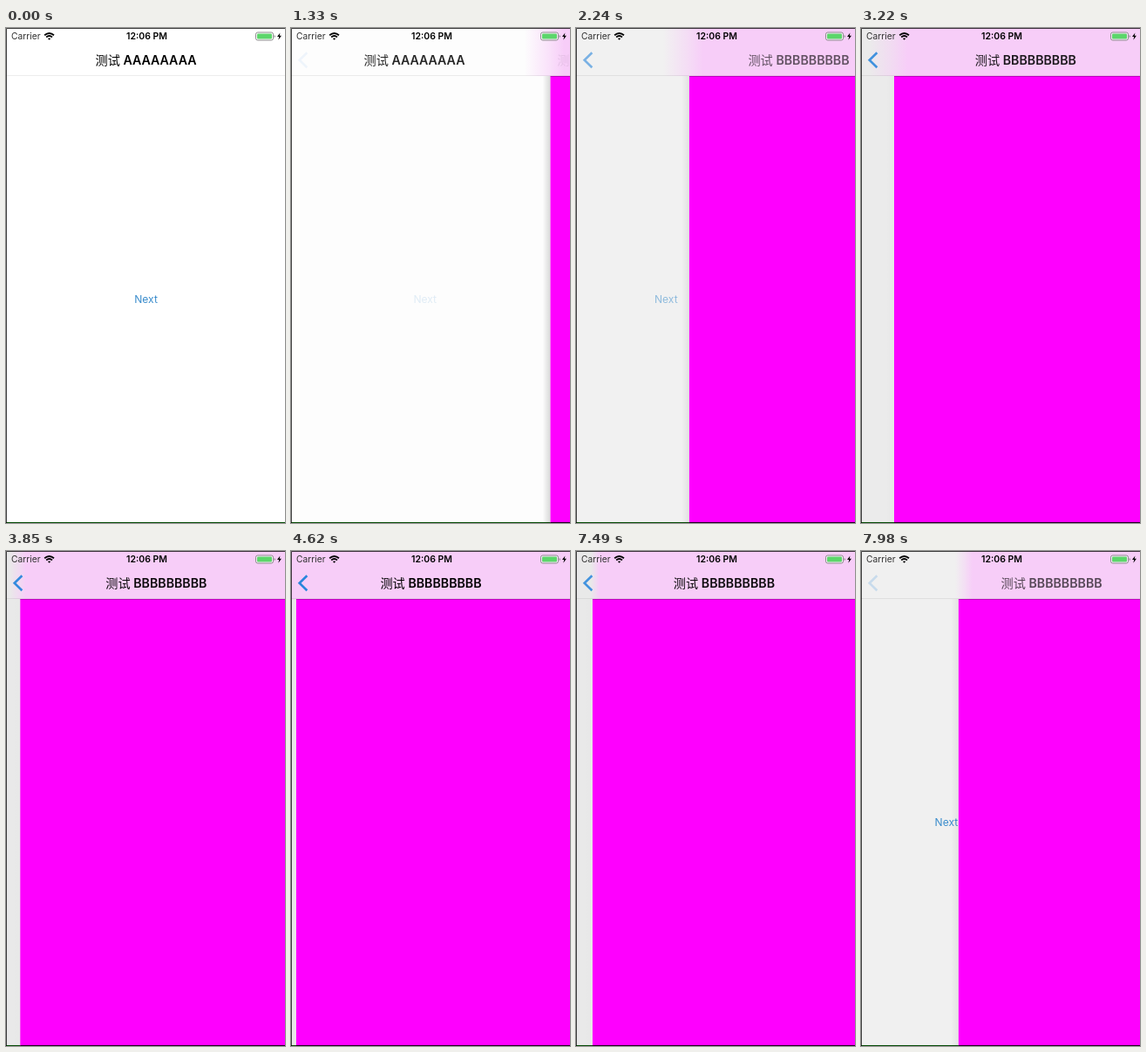
An HTML page that plays this animation: 320x567 px, repeating every 8000 ms.

```html
<!DOCTYPE html>
<html lang="zh">
<head>
<meta charset="utf-8">
<title>Navigation push and pop</title>
<style>
  html, body { margin: 0; width: 100%; height: 100%; overflow: hidden; background: #fff; }
  svg { display: block; width: 100vw; height: 100vh; }
  text { font-family: Inter, "Noto Sans CJK SC", "Noto Sans CJK", sans-serif; text-anchor: middle; }
  .title { font-size: 14.2px; font-weight: 600; }
  .han { font-weight: 500; }
  .carrier { font-size: 10.3px; fill: #333; text-anchor: start; }
  .clock { font-size: 10.5px; font-weight: 600; }
</style>
</head>
<body>
<svg viewBox="0 0 320 567" preserveAspectRatio="none">
  <defs>
    <linearGradient id="tint" gradientUnits="userSpaceOnUse" y1="0" y2="0">
      <stop offset="0" stop-color="#f7cdf8" stop-opacity="0"/>
      <stop offset=".6" stop-color="#f7cdf8" stop-opacity=".55"/>
      <stop offset="1" stop-color="#f7cdf8"/>
    </linearGradient>
    <linearGradient id="shade">
      <stop offset="0" stop-opacity="0"/>
      <stop offset="1" stop-opacity=".16"/>
    </linearGradient>
  </defs>

  <rect id="back" width="320" height="567"/>
  <text id="next" y="315.2" font-size="12.1" fill="#3a8ccc">Next</text>
  <rect y="566" width="320" height="1" fill="#064d06"/>

  <g id="page">
    <rect id="shadow" x="-9" y="55" width="9" height="512" fill="url(#shade)"/>
    <rect y="55" width="320" height="512" fill="#fe00fe"/>
    <rect y="55" width="320" height="1" fill-opacity=".25"/>
    <rect y="566" width="320" height="1" fill="#200020"/>
  </g>

  <rect id="bar" width="320" height="55"/>
  <rect id="barTint" width="320" height="55" fill="url(#tint)"/>
  <rect y="54" width="320" height="1" fill-opacity=".07"/>
  <text id="titleA" class="title" y="41.5"><tspan class="han">测试</tspan> AAAAAAAA</text>
  <text id="titleB" class="title" y="41.5"><tspan class="han">测试</tspan> BBBBBBBBB</text>
  <path id="arrow" d="M18.4 28.2 9.7 36.7 18.4 45.2" fill="none" stroke="#2a86dc" stroke-width="2.6"/>

  <text class="carrier" x="6" y="13.2">Carrier</text>
  <g fill="none" stroke="#000" stroke-width="1.8">
    <path d="M44.2 8.3Q49.6 3.7 55 8.3"/>
    <path d="M46.2 10.5Q49.6 7.6 53 10.5"/>
  </g>
  <path d="M47.9 12.1Q49.6 10.7 51.3 12.1L49.6 13.8Z"/>
  <text class="clock" x="161.5" y="13.3">12:06 PM</text>
  <rect x="286.5" y="5" width="20" height="9" rx="2.2" fill="#fff" fill-opacity=".5" stroke="#8c8c8c"/>
  <rect x="288" y="6.5" width="17" height="6" rx="1" fill="#5cd66b"/>
  <path d="M307.6 8v3q1.3-.5 1.3-1.5t-1.3-1.5" fill="#8c8c8c"/>
  <path d="M314.4 5.4 311 10h2.2l-.8 3.8 3.5-5h-2.2Z"/>

  <path d="M.5 567V.5H320" fill="none" stroke="#000" stroke-opacity=".75"/>
</svg>
<script>
  const LOOP = 8000, STEP = 70;
  const PRESS = 1050, PUSH = 1080, BAR_SETTLED = 4410, SETTLED = 5110, POP = 7270;
  const $ = id => document.getElementById(id);
  const set = (id, attrs) => {
    for (const name in attrs) $(id).setAttribute(name, attrs[name]);
  };

  // Critically damped spring, falling from 1 to 0.
  const spring = ms => {
    const y = 1.73 * Math.max(0, ms) / 1000;
    return (1 + y) * Math.exp(-y);
  };

  // Share of the stage still uncovered; it drops to 0 once settled.
  const openness = (t, settled) => {
    if (t >= POP) return 1 - spring(t - POP);
    return t >= settled ? 0 : spring(t - PUSH);
  };

  function drawPages(t) {
    const p = openness(t, SETTLED), q = 1 - p;
    const level = Math.round(255 * (1 - .09 * q));
    const grey = `rgb(${level},${level},${level})`;
    set('back', { fill: grey });
    set('bar', { fill: grey });
    set('next', {
      x: 160.5 - 96 * q,
      opacity: t < PRESS || t >= POP ? 1 : .1 + .72 * q
    });
    set('page', { transform: `translate(${1 + 319 * p})` });
    set('shadow', { opacity: q > 0 ? p : 0 });
  }

  function drawBar(t) {
    const p = openness(t, BAR_SETTLED), q = 1 - p, popping = t >= POP;
    const x = 1 + 319 * p;
    const spread = Math.min(1, p * 8.4);
    const lead = popping ? 4 : 30 * Math.min(1, q * 15);
    set('tint', { x1: x - lead * spread, x2: x + 16 * spread });
    set('barTint', { opacity: q > 0 ? 1 : 0 });
    set('titleA', { x: 160.5 - 270 * q, opacity: Math.max(0, 1 - 2.2 * q) });
    set('titleB', {
      x: 160.5 + p * (popping ? 167 : 248 - 32 * p),
      opacity: q
    });
    set('arrow', { opacity: popping ? Math.max(0, 1 - 2.3 * p) : q });
  }

  const start = performance.now();
  function tick() {
    const now = (performance.now() - start) % LOOP;
    const t = Math.floor(now / STEP) * STEP;
    drawPages(t);
    drawBar(t);
    requestAnimationFrame(tick);
  }
  tick();
</script>
</body>
</html>
```
